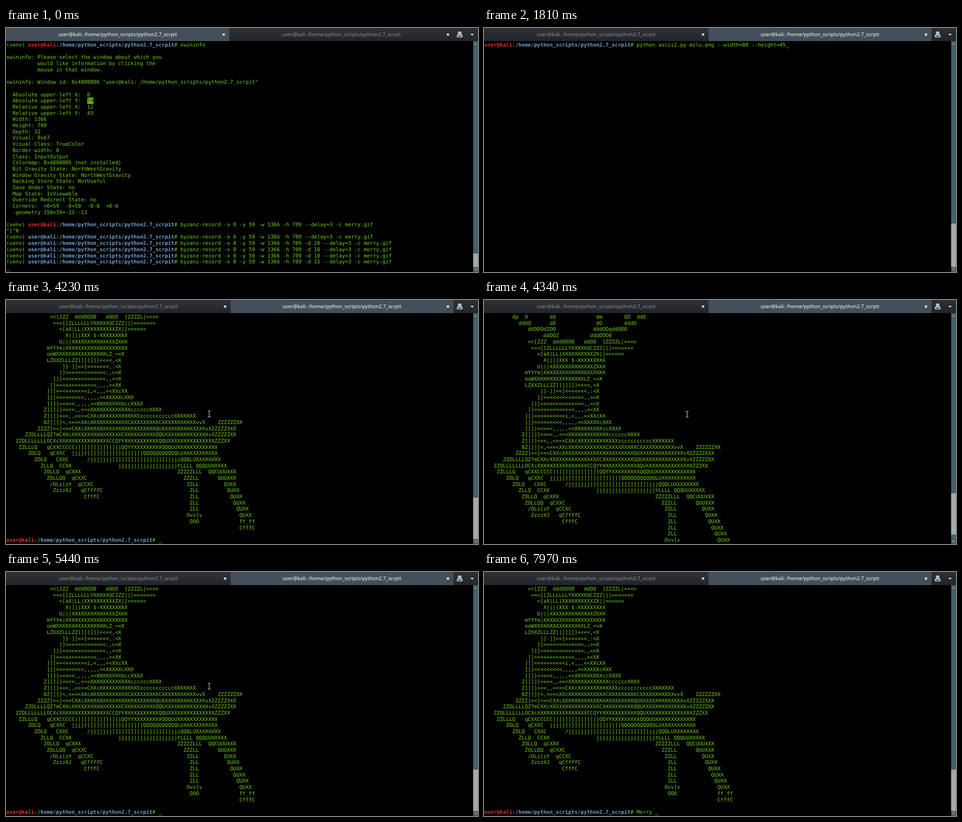
An HTML page that plays this animation: 1039 by 539 pixels, repeating every 8000 ms.

```html
<!DOCTYPE html>
<html lang="en">
<head>
<meta charset="utf-8">
<title>Terminal</title>
<style>
  html, body { margin: 0; width: 100%; height: 100%; overflow: hidden; background: #000; }
  #stage {
    position: absolute; left: 0; top: 0; width: 1366px; height: 709px; overflow: hidden;
    background: #000; transform: scale(.76061); transform-origin: 0 0;
    text-rendering: geometricPrecision; font-variant-ligatures: none;
  }
  #stage div, #stage svg, pre { position: absolute; }
  #bar { left: 0; top: 0; width: 1366px; height: 38px; background: linear-gradient(#2d3237, #22262a); }
  .tab {
    top: 0; height: 38px; box-sizing: border-box; color: #8d9194;
    font: 14.6px/38px "Noto Sans", sans-serif; text-align: center; white-space: pre;
  }
  .tab.active { color: #fff; background: #434f5a; }
  .tab svg { right: 12px; top: 15px; }
  pre { left: 1px; top: 40px; margin: 0; color: #73d216; font: 14.95px/18px "DejaVu Sans Mono", monospace; }
  pre b { color: #ef2929; }
  pre b + b { color: #729fcf; }
  mark { background: #73d216; color: #000; display: inline-block; height: 18px; vertical-align: top; }
  #cursor { width: 9px; height: 1.3px; background: #73d216; }
  #trough { left: 1352px; top: 38px; width: 14px; height: 671px; background: #455f6b; }
  #thumb { left: 1352px; width: 14px; background: #a6a7a8; }
</style>
</head>
<body>
<div id="stage">
  <div id="bar"></div>
  <div class="tab"></div>
  <div class="tab"></div>
  <svg width="71" height="38" style="left:1295px;top:0" fill="none" stroke="#eee" stroke-width="2">
    <path d="M14 12h8v9h-8zM15 21h-4v5h14v-5h-4M18 13v7M15 16.500h6"/>
    <path d="M49 17h10l-5 5z" fill="#eee" stroke="none"/>
  </svg>
  <pre id="text"></pre>
  <div id="cursor"></div>
  <div id="trough"></div>
  <div id="thumb"></div>
  <svg width="14" height="671" style="left:1352px;top:38px" fill="#aeb8bd">
    <path d="M3.500 10l3.500-4 3.500 4zM3.500 661l3.500 4 3.500-4z"/>
  </svg>
  <svg id="pointer" width="10" height="20" fill="none" stroke="#ccc" stroke-width="1.600">
    <path d="M1 1.500h3l1 1 1-1h3M5 2v16M1 18.500h3l1-1 1 1h3"/>
  </svg>
</div>
<script>
const HOST = 'user@kali', PATH = '/home/python_scripts/python2.7_scrpit';
const LOOP = 8000, ROWS = 37, INDENT = HOST.length + PATH.length + 3;
const $ = id => document.getElementById(id);
const tabs = document.querySelectorAll('.tab');

const esc = s => s.replace(/&/g, '&amp;').replace(/</g, '&lt;');
const prompt = cmd => `<b>${HOST}</b>:<b>${PATH}</b># ${cmd}`;
const venv = cmd => '(venv) ' + prompt(cmd);
const record = opts => venv(`byzanz-record -x 0 -y 59 -w 1366 -h 709 ${opts}--delay=3 -c merry.gif`);

const INFO = [venv('xwininfo'), ...`
xwininfo: Please select the window about which you
          would like information by clicking the
          mouse in that window.

xwininfo: Window id: 0x4800006 "${HOST}: ${PATH}"

  Absolute upper-left X:  0
  Absolute upper-left Y:  <mark>59</mark>
  Relative upper-left X:  12
  Relative upper-left Y:  43
  Width: 1366
  Height: 709
  Depth: 32
  Visual: 0xb7
  Visual Class: TrueColor
  Border width: 0
  Class: InputOutput
  Colormap: 0x4800005 (not installed)
  Bit Gravity State: NorthWestGravity
  Window Gravity State: NorthWestGravity
  Backing Store State: NotUseful
  Save Under State: no
  Map State: IsViewable
  Override Redirect State: no
  Corners:  +0+59  -0+59  -0-0  +0-0
  -geometry 150x39+-12--13
`.split('\n'), record(''), '^[^R', record(''), ...[20, 10, 10, 15].map(s => record(`-d ${s} `))];

// c{n} stands for n copies of c
const DEER = ` $O   dO {51}dO
   dO wO {19}d    OO {19}d   dO
     ddO {12}O    OO      dO    w {13}Z dO
       dOO   O      dOOd {11}dqdO       d    ddOO
 {9}dp  O       dd {13}dm       QO  ddO
 {11}ddOO      dO {13}dO       dddO
 {14}ddOOOdZOO {12}dddOOqddOOO
 {19}ddOOZ {10}dddOOO0
 {14}<<[ZZZ  dddOOO0   ddOO  ]ZZZZL|<<<<
 {15}<<<[[ZLLLLLLYXXXXXdCZZZ|||<<<<<<<
 {17}<[aX|LL|X{10}ZX||<<<<<<
 {19}X||||XXX $-X{9}
 {17}U|||X{14}ZXXX
 {13}mYYYm|X{20}
 {13}ooWX{16}LZ_<<X
 {13}LZXXZLLLZZ]]]]]]]<<<<,<X
 {18}]]-]]<<]<<<<<<<,:<X
 {17}]]<+<{11},,><X
 {15}]]]<{14},,<<X
 {14}]]<{13},,,,<<XX
 {13}]]]<{10}i,<,,,<<XXcXX
 {13}]]]<{9},,,,,<<XXXXXcXXX
 {13}]]]]<<<<<,,,,,<<X{9}ccXXXX
 {12}Z]]]]]<<<<,,<<<X{13}ccccccXXXX
 {12}Z]]]]<<<,,<<<<CXXcX{13}zc{10}XXXXXXX
 {12}0Z]]]]<,<<<<XXcX{12}CX{9}CX{11}vvX    ZZZZZZXX
 {10}ZZZZ]<<]<<<CXXcX{23}QUX{14}vXZZZZZXXX
      ZZOLLLLQZ?mCXXcX{16}CX{10}QQUX{14}vXZZZZZXX
   ZZOLLLLLLLOCXcX{16}CCQYYX{11}QQUX{15}ZZZXX
    ZZLLLQ   qCXXCCCCC)]{14}QQYYX{9}QQQUUX{13}
       ZOLQ   qCXXC  jjjj]{19}Q{11}LUX{11}
 {9}ZOLQ   CXXC      /jjjjjjj]{19}jjjQQQLUXXXXXXXX
 {11}ZLLQ  CCXX {15}j{19}YLLLL QQQUUXXXXX
 {12}ZOLLQ  qCXXX {31}ZZZZZLLL  QQCUUUXXX
 {13}ZOLLQQ  qCXXC {31}ZZZLL      QUUXXX
 {14}/OLz[zY  qCCXC {30}ZZLL        QUXX
 {15}ZzzzXJ   qCffffC {28}ZLL {9}QUXX
 {25}CfffC {29}ZLL {10}QUXX
 {59}ZLL {11}QUXX
 {59}ZLL {12}QUXX
 {58}Ovv]v {12}QUXX
 {59}OOO {13}ff_ff
 {75}CfffC
`.replace(/(.)\{(\d+)\}/g, (_, c, n) => c.repeat(n)).split('\n').map(esc);

const screens = {
  info: { tab: 0, thumb: [655, 39], lines: () => INFO },
  shell: { tab: 1, thumb: [568, 126], lines: s => [prompt(s.input)] },
  deer: { tab: 1, thumb: [548, 120], lines: s => s.ready ? [...DEER, prompt(s.input)] : DEER },
};

// each step changes part of the state
const steps = [
  [0, { screen: 'info', top: 0, line: 36, ready: false, input: '', on: true, pointer: null }],
  [100, { screen: 'shell', line: 0, ready: true }],
  [700, { on: false }],
  [1260, { on: true }],
  [1810, { input: 'python ascii2.py milu.png --width=80 --height=45' }],
  [2370, { on: false }],
  [2570, { on: true }],
  [2620, { line: 1, ready: false }],
  [2760, { screen: 'deer', top: 8, line: 44, input: '' }],
  [2810, { ready: true }],
  [3150, { on: false }],
  [3760, { on: true }],
  [4020, { pointer: [581, 316] }],
  [4080, { pointer: [584, 323] }],
  [4150, { pointer: [586, 328] }],
  [4230, { pointer: [588, 331] }],
  [4290, { pointer: [588, 332] }],
  [4340, { top: 4 }],
  [4690, { top: 0 }],
  [5440, { top: 8 }],
  [5510, { on: false }],
  [5910, { pointer: [587, 331] }],
  [6090, { on: true }],
  [6850, { pointer: null }],
  [6900, { input: 'M' }],
  [7330, { input: 'Me' }],
  [7580, { input: 'Mer' }],
  [7700, { input: 'Merr' }],
  [7810, { input: 'Merry' }],
  [7970, { input: 'Merry ' }],
];

function place(el, x, y) {
  el.style.left = x + 'px';
  el.style.top = y + 'px';
}

function draw(s) {
  const { tab, thumb, lines } = screens[s.screen];
  const split = tab ? 649.5 : 646;
  tabs.forEach((el, i) => {
    el.classList.toggle('active', i === tab);
    el.style.left = (i ? split : 0) + 'px';
    el.style.width = (i ? 1295 - split : split) + 'px';
  });
  $('text').innerHTML = lines(s).slice(s.top, s.top + ROWS).join('\n');

  const row = s.line - s.top, col = s.ready ? INDENT + s.input.length : 0;
  $('cursor').hidden = !s.on || row >= ROWS;
  place($('cursor'), 1 + col * 9, 56.8 + row * 18);

  place($('thumb'), 1352, thumb[0] + s.top * 3.3);
  $('thumb').style.height = thumb[1] + 'px';

  $('pointer').style.display = s.pointer ? '' : 'none';
  if (s.pointer) place($('pointer'), s.pointer[0] - 5, s.pointer[1] - 10);
}

tabs.forEach(el => {
  el.innerHTML = `${HOST}: ${PATH}<svg width="8" height="8" stroke="#fff" stroke-width="2.200"><path d="M.8.8l6.400 6.400M7.200.8L.8 7.200"/></svg>`;
});

let shown = -1;
function tick() {
  const t = performance.now() % LOOP;
  const now = steps.filter(([at]) => at <= t);
  if (now.length !== shown) {
    shown = now.length;
    draw(Object.assign({}, ...now.map(step => step[1])));
  }
  requestAnimationFrame(tick);
}
tick();
</script>
</body>
</html>
```
